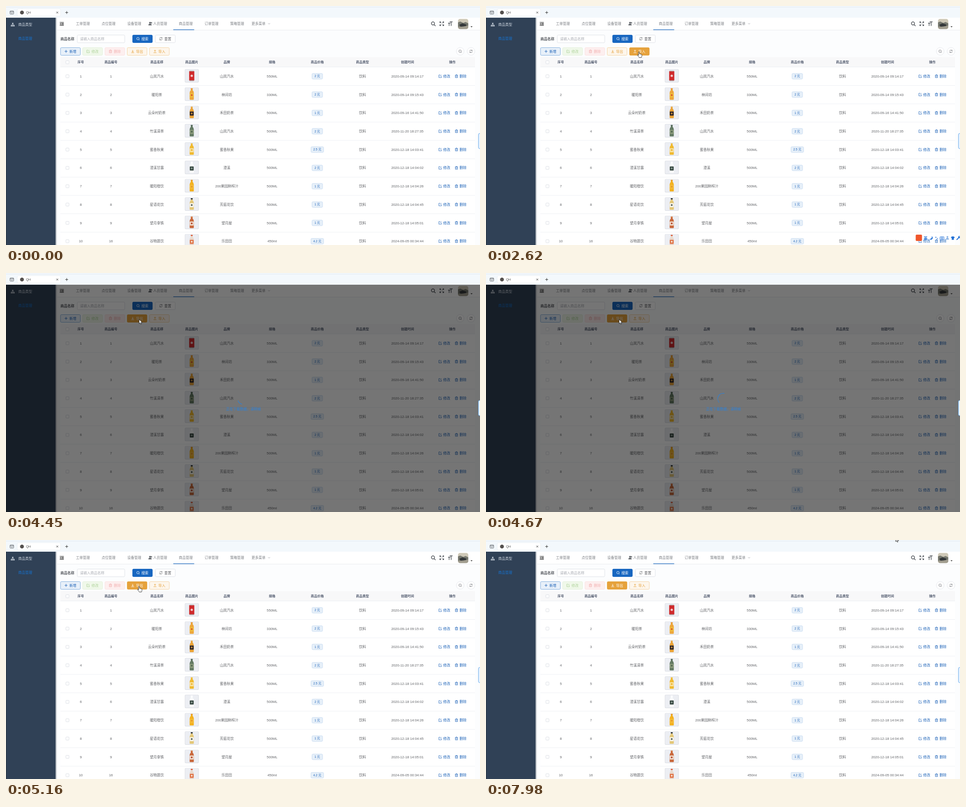
An HTML page for the animation above (8000 ms loop, 1054x531 px).

```html
<!DOCTYPE html>
<html>
<head>
<meta charset="utf-8">
<title>商品管理</title>
<style>
html, body { margin: 0; width: 100%; height: 100%; overflow: hidden; background: #fff; }
svg { display: block; width: 100vw; height: 100vh; }
text { font-family: "Liberation Sans", "Noto Sans CJK SC", "Noto Sans CJK", sans-serif; white-space: pre; }
</style>
</head>
<body>
<svg id="stage" viewBox="0 0 1054 531" xmlns="http://www.w3.org/2000/svg"></svg>
<script>
const BLUE = '#1d63b8', GREY = '#606266', SIZE = 7.75, STEP = 70, LOOP = 8000;
const stage = document.getElementById('stage');

// ---- drawing helpers ----
const rect = (x, y, w, h, fill, more = '') =>
  `<rect x="${x}" y="${y}" width="${w}" height="${h}" fill="${fill}" ${more}/>`;
const box = (x, y, w, h, fill, line, r = 2) =>
  rect(x + .5, y + .5, w - 1, h - 1, fill, `stroke="${line}" stroke-width=".9" rx="${r}"`);
const disc = (x, y, r, fill, more = '') => `<circle cx="${x}" cy="${y}" r="${r}" fill="${fill}" ${more}/>`;
const text = (x, y, s, fill = GREY, { size = SIZE, anchor = 'start', bold = false } = {}) =>
  `<text x="${x}" y="${y + size * .36}" font-size="${size}" fill="${fill}" text-anchor="${anchor}"` +
  `${bold ? ' font-weight="600"' : ''}>${s}</text>`;
const mid = (x, y, s, fill, opt) => text(x, y, s, fill, { anchor: 'middle', ...opt });
const icon = (x, y, d, color, w = .9) =>
  `<path transform="translate(${x} ${y})" d="${d}" fill="none" stroke="${color}" stroke-width="${w}"/>`;
const shape = (x, y, d, fill) => `<path transform="translate(${x} ${y})" d="${d}" fill="${fill}"/>`;

const D = {
  plus: 'M-3.2 0H3.2M0-3.2V3.2',
  cross: 'M-2-2L2 2M2-2L-2 2',
  edit: 'M.5-2.8H-3V3H2.8V-.2M-.8.8L3-3',
  trash: 'M-3.2-2H3.2M-1.2-2V-3.3H1.2V-2M-2.5-2V3.2H2.5V-2M-.9-.3V1.8M.9-.3V1.8',
  down: 'M0-3V1.3M-2-.5L0 1.5L2-.5M-3.2 3H3.2',
  up: 'M0 1.5V-2.8M-2-1L0-3L2-1M-3.2 3H3.2',
  search: 'M2.4-.3A2.7 2.7 0 1 1-3-.3A2.7 2.7 0 1 1 2.4-.3M1.6 1.7L3.3 3.4',
  reload: 'M-2.8-.4A2.8 2.8 0 0 1 2.3-1.7M2.8.4A2.8 2.8 0 0 1-2.3 1.7M2.6-3.2V-1.4H.8M-2.6 3.2V1.4H-.8',
  arrow: 'M0 0V9.6L2.2 7.6L3.6 10.8L5.1 10.2L3.8 7.1H6.8Z',
  hand: 'M-1.2 8V1A1.1 1.1 0 0 1 1 1V4.6C2 4 2.8 4.4 3 5C4 4.5 4.7 5 4.9 5.7C5.8 5.3 6.3 6 6.3 6.9V9.3' +
        'C6.3 10.7 5.5 11.3 5.3 12.5H.2C-.3 11-2.4 9.4-3.4 7.5C-3.8 6.5-2.8 6.1-2 6.8Z'
};

// ---- page parts ----
function tabStrip() {
  return rect(0, 0, 1054, 26, '#f3f8fc') + rect(0, 2, 1054, .8, '#dfe8f0') +
    rect(25, 6, 96.5, 16.5, '#fff', 'rx="3" stroke="#e3e9ef" stroke-width=".6"') +
    box(8.5, 10.5, 9, 8, 'none', '#4a4f55', 1) + icon(13, 14.5, 'M-4-1.4H4M-1.5.5L0 2L1.5.5', '#4a4f55') +
    disc(35.5, 14.5, 4.3, '#54504e') + text(44.5, 14.5, 'QH', '#555', { size: 7.2 }) +
    icon(114, 14.5, D.cross, '#333') + icon(135, 14.5, D.plus, '#222');
}

function sidebar() {
  return rect(0, 26, 1, 505, '#28323f') + rect(1, 26, 109, 505, '#304156') +
    rect(110, 26, 4, 505, 'url(#edge)') +
    shape(15, 41.5, 'M-1.4-4H1.4V-1.4H-1.4ZM-4.2 1.2H-1.8V3.8H-4.2ZM-1.2 1.2H1.2V3.8H-1.2ZM1.8 1.2H4.2V3.8H1.8Z', '#d4dbe4') +
    icon(15, 41.5, 'M0-1.5V1.2M-3 1.2V0H3V1.2', '#d4dbe4', .7) +
    text(27.3, 41.5, '商品类型', '#d4dbe4') + text(27.3, 72, '商品管理', '#1673d0');
}

function avatar() {
  return `<g clip-path="url(#face)">${rect(1005, 28.5, 23, 23, '#cfc9b8')}` +
    shape(1005, 28.5, 'M0 8L5 6L12 9L17 7L23 10V18H0Z', '#76786f') +
    shape(1005, 28.5, 'M3 13L10 10L19 13L18 17L6 18Z', '#34383a') +
    shape(1005, 28.5, 'M0 18L12 17L23 15V23H0Z', '#a19d8f') + '</g>';
}

function navBar() {
  const names = [[171, '工单管理'], [228, '点位管理'], [285.3, '设备管理'], [342.8, '人员管理'],
    [399.8, '商品管理'], [457, '订单管理'], [514, '策略管理'], [561.5, '更多菜单']];
  return rect(113, 26, 941, 27.5, '#fff') + rect(113, 53.2, 941, .8, '#e4e7ec') +
    icon(124, 39.5, 'M-4.5-3.2H4.5M-1-.9H4.5M-1 1.2H4.5M-4.5 3.4H4.5', '#222', 1.1) +
    shape(124, 39.5, 'M-4.6 .2L-2-1.7V2Z', '#222') +
    names.map(([x, s]) => mid(x, 39.3, s, '#7c7f84')).join('') +
    disc(320.3, 37.2, 2, '#5f6368') + shape(320.3, 39.4, 'M-3.5 3.6V2.2Q-3 0 0 0Q3 0 3.5 2.2V3.6Z', '#5f6368') +
    disc(323.5, 37.5, 1.4, '#5f6368') + icon(585, 39.3, 'M-2-1L0 1L2-1', '#909399', .8) +
    rect(372, 52, 46.5, 1.4, '#3076c4') +
    icon(950.3, 39.5, 'M2.5-.8A3.4 3.4 0 1 1-4.3-.8A3.4 3.4 0 1 1 2.5-.8M1.6 1.8L4.8 5', '#4c5157', 1.5) +
    icon(969, 39.3, 'M-4.3-1.8V-4.3H-1.8M1.8-4.3H4.3V-1.8M4.3 1.8V4.3H1.8M-1.8 4.3H-4.3V1.8' +
      'M-4-4L-1.3-1.3M4-4L1.3-1.3M4 4L1.3 1.3M-4 4L-1.3 1.3', '#4c5157', 1.2) +
    icon(988, 39.3, 'M-1.5-4H5M1.8-4V5M-5-1H0M-2.6-1V5', '#4c5157', 1.4) +
    avatar() + shape(1035.2, 46, 'M-2.3-1H2.3L0 1.4Z', '#444');
}

function button(x, label, mark, fill, line, color, y = 92) {
  return box(x, y, 45, 18, fill, line) + icon(x + 12.7, y + 8.8, D[mark], color) +
    text(x + 20.2, y + 8.8, label, color);
}

function toolRow() {
  const round = (x, mark) => disc(x, 100.7, 8.6, '#fff', 'stroke="#dcdfe6" stroke-width=".7"') +
    icon(x, 100.7, D[mark], '#5c5f66', .8);
  return text(121, 73, '商品名称', '#55585e', { bold: true }) +
    box(158, 64, 106.5, 18.2, '#fff', '#dcdfe6') + text(164.5, 73, '请输入商品名称', '#a8abb2') +
    button(281, '搜索', 'search', '#1766c0', '#1766c0', '#fff', 64) +
    button(331.8, '重置', 'reload', '#fff', '#dcdfe6', GREY, 64) +
    button(120.8, '新增', 'plus', '#e8f0f9', '#78a8dc', BLUE) +
    button(170, '修改', 'edit', '#f0f8ea', '#e1f0d8', '#aed39b') +
    button(219.6, '删除', 'trash', '#fdefef', '#fbdfdf', '#f3b1b1') +
    round(1010, 'search') + round(1034, 'reload');
}

// name, brand, size, price, date, then body, label, cap and patch colours
const drinks = [
  ['山岚汽水', '山岚汽水', '550ML', '2', '2020-09-14 09:14:17'],
  ['暖阳茶', '林间坊', '330ML', '2', '2020-09-14 09:15:43', '#eda73c', '#f0bd3c', '#e9962f', '#d8562f'],
  ['云朵村奶茶', '禾田奶茶', '500ML', '1', '2020-09-16 14:41:50', '#eaa336', '#29242a', '#e8a945', '#c58a35'],
  ['竹溪清茶', '山岚汽水', '500ML', '2', '2020-11-20 18:27:35', '#637a63', '#8b9b7c', '#4c6353', '#4e654f'],
  ['蜜香秋果', '蜜香秋果', '500ML', '2.5', '2020-12-18 14:03:41', '#f0b92f', '#f7e2a2', '#eec04a', '#eeb534'],
  ['澄溪甘露', '澄溪', '500ML', '2', '2020-12-18 14:04:02', '#fafbfc', '#34463f', '#fff', '#8b9a93'],
  ['暖阳橙饮', '200果园鲜榨汁', '500ML', '1', '2020-12-18 14:04:26', '#f3b120', '#f5bd38', '#e99a20', '#e7952a'],
  ['星语花饮', '芳庭花饮', '500ML', '1', '2020-12-18 14:04:45', '#e3c777', '#f7f4ea', '#2c3134', '#55605a'],
  ['望月拿铁', '望月屋', '500ML', '1', '2020-12-18 14:05:01', '#c8683c', '#f0dfd0', '#d87b45', '#b5482c'],
  ['谷物晨饮', '乐田田', '450ml', '4.2', '2024-09-05 00:34:44', '#e9d9cd', '#df7347', '#db5a36', '#f3e4d8']
];

function bottle(y, body, label, cap, patch) {
  if (!body) {
    return rect(407.3, y - 11, 11.4, 22.3, '#cf2a2c', 'rx="2"') + rect(408.2, y - 11.4, 9.6, 1.6, '#b9b4b4', 'rx=".6"') +
      rect(408.2, y + 10, 9.6, 1.5, '#a49b9b', 'rx=".5"') + disc(413, y, 2.6, '#efc9c9');
  }
  return shape(413, y, 'M-2-10.8H2V-8.6Q4.6-6 4.6-3V0L4.2 1L4.6 2V11.4Q4.6 12.7 3.4 12.7H-3.4Q-4.6 12.7-4.6 11.4' +
      'V2L-4.2 1L-4.6 0V-3Q-4.6-6-2-8.6Z', body) +
    rect(410.8, y - 13, 4.4, 2.6, cap, 'rx=".6"') + rect(408.7, y - 2, 8.6, 9, label, 'rx=".8"') +
    disc(413, y + 2.2, 2, patch);
}

function row([name, brand, size, price, date, ...tones], i) {
  const y = 156 + i * 40.72, w = price.length > 1 ? 29 : 24.5;
  const check = box(132.7, y - 3.8, 7.8, 7.8, '#fff', '#d9dce3', 1);
  return rect(121, y + 20.2, 922, .7, '#e7eaf0') + check +
    mid(166.3, y, i + 1) + mid(233.3, y, i === 9 ? 16 : i + 1) + mid(335.4, y, name) +
    rect(397.6, y - 15.8, 31, 29.8, '#d9dce2', 'rx="2.5"') + rect(398.4, y - 15.2, 29.2, 28.2, '#eceef3', 'rx="2"') +
    bottle(y - 1, ...tones) +
    mid(491, y, brand) + mid(591.7, y, size) +
    box(692.2 - w / 2, y - 6.6, w, 13.4, '#e7f0f9', '#c3d9f0') + mid(692.2, y, price + ' 元', BLUE, { size: 6.8 }) +
    mid(792.7, y, '饮料') + mid(892.7, y, date) +
    icon(965.5, y, D.edit, BLUE, .8) + text(972.3, y, '修改', BLUE) +
    icon(1001.7, y, D.trash, BLUE, .8) + text(1008.5, y, '删除', BLUE);
}

function table() {
  const heads = [[166.3, '序号'], [233.3, '商品编号'], [335.4, '商品名称'], [413, '商品图片'], [491, '品牌'],
    [591.7, '规格'], [692.2, '商品价格'], [792.7, '商品类型'], [892.7, '创建时间'], [992.5, '操作']];
  return rect(121, 113.5, 922, 418, '#fff') + rect(121, 113.5, 922, 22, '#f8f8f9') +
    rect(121, 135.2, 922, .7, '#e7eaf0') + box(132.7, 121, 7.8, 7.8, '#fff', '#d9dce3', 1) +
    heads.map(([x, s]) => mid(x, 124.5, s, '#515a6e', { size: 7.2, bold: true })).join('') +
    drinks.map(row).join('');
}

function inputBar() {
  const c = '#1f6fd6';
  return rect(955.5, 508, 14, 14, '#f0562b', 'rx="2"') + mid(977.5, 515.5, '英', c, { size: 8.5, bold: true }) +
    shape(990, 515.5, 'M1-4A4 4 0 1 1-4 1.8A4.2 4.2 0 0 0 1-4Z', c) +
    disc(1000.3, 514, 1.1, 'none', `stroke="${c}" stroke-width=".8"`) + icon(1003.3, 516.5, 'M.3-1V.5L-.7 2', c, 1.2) +
    box(1009, 512, 10, 7.5, '#fff', c, 1) + icon(1014, 515.7, 'M-3-1.2H3M-3 .4H3M-2 2H2', c, .8) +
    disc(1026, 513, 2, '#8fb5e4') + shape(1026, 515, 'M-3.6 4Q-3 0 0 0Q3 0 3.6 4Z', '#8fb5e4') +
    shape(1038, 515.8, 'M-2-3.8H2L4.5-1.5L3-.2L2.4-.8V3.8H-2.4V-.8L-3-.2L-4.5-1.5Z', c) +
    icon(1050, 515.5, 'M-3.5 4L1-.6M1-.6A2.5 2.5 0 0 1 3-4M1-.6A2.5 2.5 0 0 0 4.2-2.5', c, 1.8);
}

stage.innerHTML = `<defs>
  <linearGradient id="edge"><stop stop-color="#8b939d"/><stop offset=".5" stop-color="#d3d7db"/>
  <stop offset="1" stop-color="#fff"/></linearGradient>
  <clipPath id="face"><rect x="1005" y="28.5" width="23" height="23" rx="5"/></clipPath></defs>` +
  rect(0, 0, 1054, 531, '#fcfdfe') + navBar() + sidebar() + toolRow() + table() + tabStrip() +
  '<g id="buttons"></g><g id="ime">' + inputBar() + '</g>' +
  rect(0, 26, 1054, 505, '#000', 'id="veil"') +
  '<g id="wait"><path id="arc" fill="none" stroke="#2b82dc" stroke-width="1.1" stroke-linecap="round"/>' +
  mid(528, 302.7, '正在下载数据，请稍候', '#2b82dc') + '</g>' +
  rect(1050.5, 283, 8, 34, '#e6f2fe', 'rx="3" stroke="#5ba2e8" stroke-width=".9"') +
  '<path id="cursor" stroke="#111" stroke-width=".8" stroke-linejoin="round" fill="#fff"/>';

const [buttons, ime, veil, wait, arc, cursor] =
  ['buttons', 'ime', 'veil', 'wait', 'arc', 'cursor'].map(id => document.getElementById(id));

// ---- motion ----
// each move: start time, number of steps, way points
const moves = [
  [70, 11, [[640, 528], [420, 300], [190, 110], [167, 62], [250, 45], [361.5, 49.5]]],
  [900, 1, [[361.5, 49.5], [361.5, 55]]],
  [1100, 12, [[361.5, 55], [368, 60], [340, 86], [302, 97], [293, 100]]],
  [1940, 1, [[293, 100], [295.5, 100]]],
  [2340, 7, [[295.5, 100], [322, 103], [340.3, 102], [340.3, 102]]],
  [2960, 5, [[340.3, 102], [310, 104], [296, 103]]],
  [7340, 10, [[296, 103], [420, 68], [760, 18], [911, -6]]]
];
const veilSteps = [0, 0, .05, .15, .28, .42, .54, .62, .62, .54, .25, .07, .02, 0];

const stepsDone = (t, start, n) => Math.max(0, Math.min(n, Math.floor((t - start) / STEP) + 1));

function along(pts, p) {
  const s = p * (pts.length - 1), i = Math.min(Math.floor(s), pts.length - 2), f = s - i;
  return pts[i].map((v, k) => v + (pts[i + 1][k] - v) * f);
}

function cursorAt(t) {
  const [start, n, pts] = moves.filter(m => t >= m[0]).pop() || moves[0];
  return along(pts, stepsDone(t, start, n) / n);
}

function spinner(k) {
  const from = (140 + (k - 9) * 12) * Math.PI / 180, len = Math.max(2, (k - 4) * 28) * Math.PI / 180;
  const at = a => `${527.5 + 12.3 * Math.cos(a)} ${279.5 + 12.3 * Math.sin(a)}`;
  return `M${at(from)}A12.3 12.3 0 ${len > Math.PI ? 1 : 0} 1 ${at(from + len)}`;
}

function draw(t) {
  const [x, y] = cursorAt(t);
  const over = left => x >= left && x <= left + 45 && y >= 92 && y <= 110;
  const amber = (left, label, mark, on) => on
    ? button(left, label, mark, '#e6a23c', '#e6a23c', '#fff')
    : button(left, label, mark, '#fdf6ec', '#f3d19e', '#e6a23c');
  buttons.innerHTML = amber(269, '导出', 'down', over(269) || t >= 4100) +
    amber(318.6, '导入', 'up', over(318.6));
  ime.style.display = t >= 420 && t < 4100 ? '' : 'none';

  const k = stepsDone(t, 4100, 13), dark = veilSteps[k];
  veil.setAttribute('opacity', dark);
  wait.setAttribute('opacity', Math.min(1, (dark / .54) ** 2));
  arc.setAttribute('d', spinner(k));

  const busy = t >= 4170 && t < 5020;
  const hand = t >= 1940 && !busy && (over(269) || over(318.6));
  cursor.style.display = t >= 70 ? '' : 'none';
  cursor.setAttribute('d', hand ? D.hand : D.arrow);
  cursor.setAttribute('transform', `translate(${x} ${y})`);
}

let begin;
function tick(now) {
  begin ??= now;
  draw((now - begin) % LOOP);
  requestAnimationFrame(tick);
}
draw(0);
requestAnimationFrame(tick);
</script>
</body>
</html>
```
